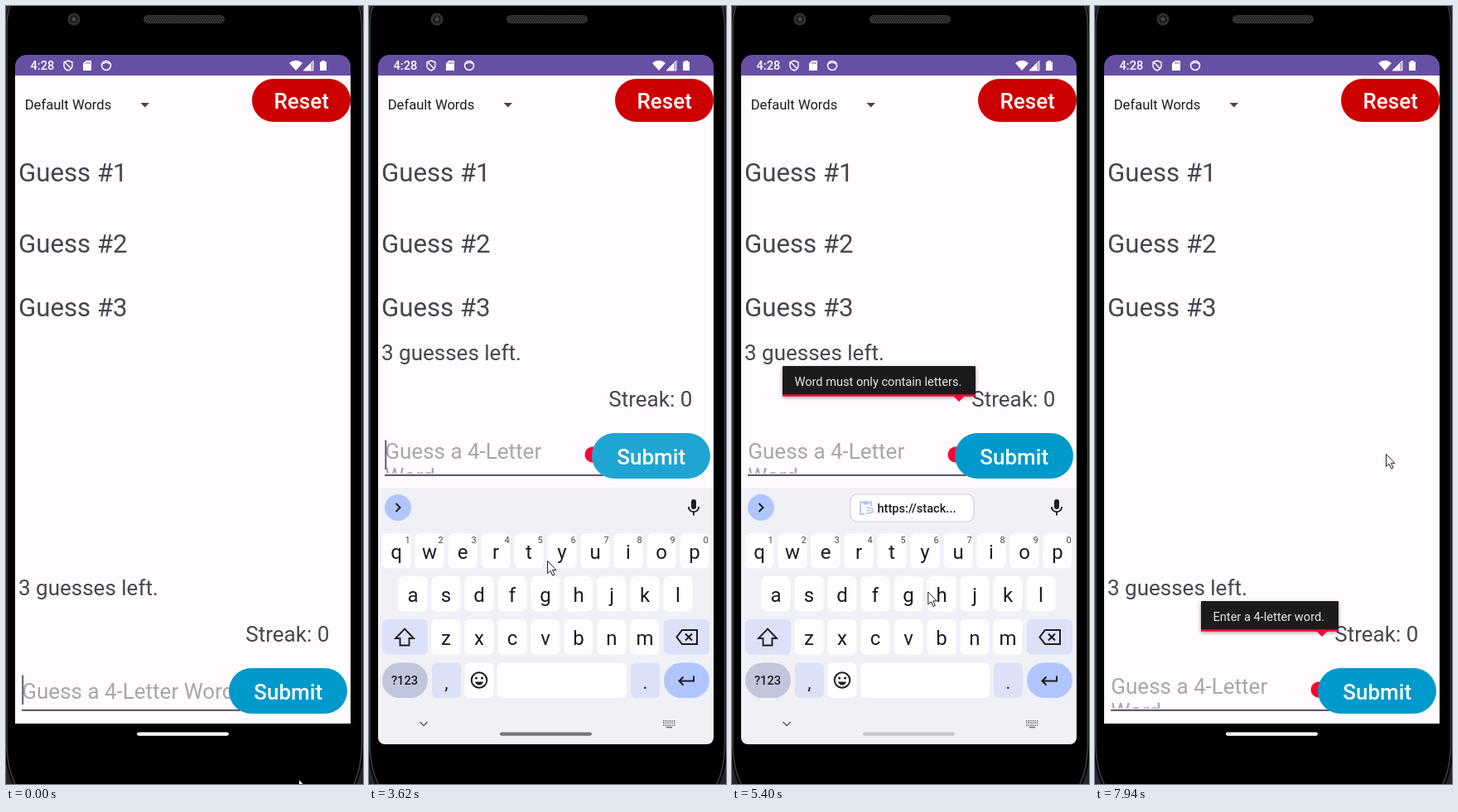
An HTML page with a canvas that plays this animation: 431x940 px, repeating every 8000 ms.

```html
<!DOCTYPE html>
<html lang="en">
<head>
<meta charset="utf-8">
<title>Word guessing app</title>
<style>
html, body { margin: 0; width: 100%; height: 100%; overflow: hidden; background: #000; }
canvas { display: block; width: 431px; height: 940px; }
</style>
</head>
<body>
<canvas id="stage"></canvas>
<script>
const W = 431, H = 940, LOOP = 8000;
const KB_HEIGHT = 310, NAV_ROW = 50, LIFT = 284;
const SMALL = 14.6, LABEL = 16.6, BODY = 26, TITLE = 31.2;
const canvas = document.getElementById('stage');
const dpr = window.devicePixelRatio || 1;
canvas.width = W * dpr;
canvas.height = H * dpr;
const c = canvas.getContext('2d');

// Timeline, in ms
const opens = [[1240, 1430], [4900, 5090]];
const closes = [[3720, 3960], [7080, 7330]];
const raised = [[1560, 4030], [5220, 7400]];
const clicks = [1130, 3430, 4690, 6740];
const submits = [3480, 6800];
const popups = [
  [3690, 5750, 61, 'Word must only contain letters.'],
  [7080, LOOP, 128, 'Enter a 4-letter word.']
];
const errors = [[3480, 5750], [6800, LOOP]];
const chips = [[1560, 3480], [5220, 6800]];
const typed = [
  [0, ''], [1790, '!'], [1950, '!!'], [2290, '!!!'], [2430, '!!!!'], [3480, ''],
  [5750, 'd'], [5950, 'dd'], [6150, 'ddd'], [6350, 'ddddd'], [6800, '']
];
const caretResets = [...typed.map(e => e[0]), 1130, 4030, 4690, 7400];
const pointer = [
  [0, 353, 934], [820, 347, 748], [890, 357, 743], [960, 357, 743], [1130, 190, 818],
  [1230, 188, 812], [1450, 172, 753], [1800, 230, 640], [2220, 311, 526], [2570, 316, 528],
  [2780, 316, 528], [3060, 336, 530], [3450, 336, 532], [3620, 215, 670], [3960, 245, 715],
  [4230, 257, 731], [4300, 257, 731], [4600, 181, 820], [4850, 181, 820], [5500, 240, 700],
  [6220, 308, 550], [6420, 308, 550], [6490, 340, 537], [6900, 340, 537], [7590, 351, 536],
  [7940, 351, 541], [LOOP, 351, 541]
];

const clamp = (v, a = 0, b = 1) => Math.min(b, Math.max(a, v));
const within = (t, spans) => spans.find(s => t >= s[0] && t < s[1]);
const progress = (t, [a, b]) => clamp((t - a) / (b - a));

function pointerAt(t) {
  const i = clamp(pointer.findIndex(p => p[0] > t), 1, pointer.length - 1);
  const [t0, x0, y0] = pointer[i - 1], [t1, x1, y1] = pointer[i];
  let k = clamp((t - t0) / (t1 - t0));
  k = k * k * (3 - 2 * k);
  return [x0 + (x1 - x0) * k, y0 + (y1 - y0) * k];
}

// Downward shift of the keyboard; it rests one nav row low until the app is raised
function keyboardShift(t) {
  const i = opens.findLastIndex(span => t >= span[0]);
  if (i < 0) return KB_HEIGHT;
  if (t >= closes[i][0]) return KB_HEIGHT * progress(t, closes[i]) ** 2;
  if (t >= raised[i][0]) return 0;
  return NAV_ROW + (KB_HEIGHT - NAV_ROW) * (1 - progress(t, opens[i])) ** 2;
}

function box(x, y, w, h, r, fill) {
  c.beginPath();
  c.roundRect(x, y, w, h, r);
  c.fillStyle = fill;
  c.fill();
}

function disc(x, y, r, fill) {
  c.beginPath();
  c.arc(x, y, r, 0, Math.PI * 2);
  c.fillStyle = fill;
  c.fill();
}

function shape(d, fill, stroke, width = 2) {
  const p = new Path2D(d);
  if (fill) { c.fillStyle = fill; c.fill(p); }
  if (stroke) { c.strokeStyle = stroke; c.lineWidth = width; c.stroke(p); }
}

function at(x, y, draw) {
  c.save();
  c.translate(x, y);
  draw();
  c.restore();
}

function font(size, weight = 400) {
  c.font = `${weight} ${size}px Roboto, sans-serif`;
}

function text(s, x, y, size, fill, weight, align = 'left') {
  font(size, weight);
  c.textAlign = align;
  c.fillStyle = fill;
  c.fillText(s, x, y);
}

function phone() {
  box(0, 0, W, H, 0, '#000');
  shape('M5 0Q1 10 1 24V896Q2 922 11 940', null, '#3d3d42', 1.6);
  shape('M426 0Q429.500 10 429.500 24V896Q428.500 922 420 940', null, '#3d3d42', 1.6);
  shape('M0 0H4Q0 8 0 18Z M431 0H427Q431 8 431 18Z M0 912Q3 930 8 940H0Z M431 912Q428 930 423 940H431Z', '#26262a');
  disc(82, 16, 7.5, '#333336');
  disc(82, 16, 5, '#1c1c1e');
  disc(82, 16, 2.4, '#4b4b50');
  box(166, 11, 98, 10, 5, '#343434');
  for (let y = 0; y < 4; y++)
    for (let x = 0; x < 31; x++) disc(170 + x * 3 + (y % 2) * 1.5, 12.8 + y * 2.1, 0.7, '#131313');
}

function statusBar() {
  box(11, 59, 405, 25, [14, 14, 0, 0], '#6750a4');
  text('4:28', 29.5, 77, SMALL, '#fff', 500);
  shape('M75 66L80 68V72Q80 76 75 78Q70 76 70 72V68Z M71 68L78 75', null, '#fff', 1.4);
  shape('M96.500 66H103V78H93V69.500Z', '#fff');
  shape('M97 67.500V70M99 67.500V70M101 67.500V70', null, '#6750a4', 0.9);
  c.beginPath();
  c.arc(121, 72, 5.5, 0, 7);
  c.strokeStyle = '#fff';
  c.lineWidth = 1.5;
  c.stroke();
  shape('M116 71A5.500 5.500 0 0 1 126 71Q121 67 116 71Z', '#fff');
  shape('M342 69Q350 62.500 358 69L350 78Z', '#fff');
  shape('M371 66V78H359Z', '#b9abdb');
  shape('M368 69V78H359Z', '#fff');
  shape('M371 66V78H359Z', null, '#fff', 0.8);
  shape('M379 67.500H381V66H385V67.500H387V78H379Z', '#fff');
}

function field(t) {
  const value = typed.filter(e => e[0] <= t).pop()[1];
  const hasError = within(t, errors);
  if (hasError) disc(270, 826, 9.5, '#ff0033');
  box(19, 849.8, 264, 2.2, 0, '#625b71');

  c.save();
  c.beginPath();
  c.rect(15, 800, 256, 48.5);
  c.clip();
  if (value) {
    text(value, 19.3, 837, BODY, '#1c1b1f');
    if (value[0] === 'd') box(19.3, 839, c.measureText(value).width, 1.5, 0, '#1c1b1f');
  } else if (hasError) {
    text('Guess a 4-Letter', 19.3, 831, BODY, '#a9a5ab');
    text('Word', 19.3, 861, BODY, '#a9a5ab');
  } else {
    text('Guess a 4-Letter Word', 19.3, 837, BODY, '#a9a5ab');
  }
  c.restore();

  const reset = Math.max(...caretResets.filter(v => v <= t));
  if ((t - reset) % 1000 < 500) {
    font(BODY);
    box(19.2 + c.measureText(value).width, 808.5, 2, 35.5, 0, '#625b71');
  }
}

function submitButton(t) {
  box(269, 800, 143, 55, 27.5, '#0099cc');
  const since = Math.min(...submits.map(s => t >= s ? t - s : Infinity));
  const glow = 0.12 * clamp((450 - since) / 250);
  if (glow > 0) box(269, 800, 143, 55, 27.5, `rgba(255,255,255,${glow})`);
  text('Submit', 340.7, 837.5, BODY, '#fff', 500, 'center');
}

function popup(t) {
  const p = within(t, popups);
  if (!p) return;
  const [, , x, label] = p;
  c.save();
  c.shadowColor = 'rgba(0,0,0,.4)';
  c.shadowBlur = 5;
  c.shadowOffsetY = 2;
  box(x, 719, 294 - x, 36, 1, '#1b1b1b');
  c.restore();
  box(x, 753.3, 294 - x, 2.5, 0, '#ff0033');
  shape('M267 755H281L274 762Z', '#ff0033');
  text(label, x + 14.5, 743, SMALL, '#e6e6e6');
}

function app(t) {
  const ink = '#49454f';
  box(11, 84, 405, 783, 0, '#fffbfe');
  statusBar();
  text('Default Words', 22.7, 125, LABEL, '#1c1b1f');
  shape('M162.500 117H173L167.750 122.500Z', '#4a4548');
  box(297, 88, 119, 52, 26, '#cc0000');
  text('Reset', 356.7, 124, BODY, '#fff', 500, 'center');
  [212, 297.7, 375].forEach((y, i) => text('Guess #' + (i + 1), 15, y, TITLE, ink));

  at(0, within(t, raised) ? -LIFT : 0, () => {
    text('3 guesses left.', 15, 712, BODY, ink);
    text('Streak: 0', 289.3, 768, BODY, ink);
    field(t);
    submitButton(t);
    popup(t);
  });
  box(158, 877.5, 111, 4.2, 2.1, '#fff');
}

function key(x, y, w, fill = '#fefeff', r = 6) {
  box(x, y, w, 42.5, r, fill);
}

function keyRow(letters, x, y, upper) {
  [...letters].forEach((ch, i) => {
    const cx = x + i * 40;
    key(cx - 17.5, y, 35);
    text(upper ? ch.toUpperCase() : ch, cx, y + 31, 24, '#1b1b20', 400, 'center');
  });
}

function chip() {
  box(143, 590, 149, 33, 8, '#fefeff');
  c.strokeStyle = '#c9cbd6';
  c.lineWidth = 1;
  c.stroke();
  shape('M160 614H155V599.500H168V604M158.500 601.500H164.500M161.500 599.500V597.500', null, '#b3c3f3', 1.8);
  shape('M162 606H165M162 613H165M165 606.500H167A3 3 0 0 1 167 612.500H165M162 609.500H168', null, '#b3c3f3', 1.6);
  text('https://stack...', 175.5, 612, SMALL, '#1b1b20', 500);
}

function keyboard(t) {
  const dark = '#1b1b20', func = '#dce1f7', upper = t < 2360;
  box(11, 582, 405, KB_HEIGHT, 0, '#f0f0f7');
  disc(35, 606, 16, '#b1c5ff');
  shape('M32.500 601L37.500 606L32.500 611', null, dark, 2);
  box(389, 596, 6, 12, 3, dark);
  shape('M385.800 605A6.200 6.200 0 0 0 398.200 605M392 611V615.500', null, dark, 1.8);
  if (within(t, chips)) chip();

  keyRow('qwertyuiop', 33, 637, upper);
  [...'1234567890'].forEach((n, i) => text(n, 46.5 + i * 40, 649, 11, '#44464f', 400, 'center'));
  keyRow('asdfghjkl', 53, 689, upper);
  key(16, 741, 55, func);
  shape('M43 752.500L54 764H48.500V772.500H37.500V764H32Z', upper ? dark : null, dark, upper ? 0.5 : 1.9);
  keyRow('zxcvbnm', 93, 741, upper);
  key(356, 741, 55, func);
  shape('M378 754H396V771H378L371.500 762.500Z M382 758.500L390 766.500M390 758.500L382 766.500', null, dark, 2);

  key(16, 793.5, 55, '#c1c6dc', 21);
  text('?123', 43, 820, SMALL, dark, 500, 'center');
  key(76, 793.5, 35, func);
  text(',', 93.5, 825, 22, dark, 400, 'center');
  key(115.5, 793.5, 35);
  c.beginPath();
  c.arc(133, 814.5, 9.3, 0, 7);
  c.strokeStyle = dark;
  c.lineWidth = 2;
  c.stroke();
  disc(129.5, 812, 1.5, dark);
  disc(136.5, 812, 1.5, dark);
  shape('M128 816.500H138Q136.500 820.500 133 820.500Q129.500 820.500 128 816.500Z', dark);
  key(155, 793.5, 156);
  key(316, 793.5, 35, func);
  text('.', 333.5, 825, 22, dark, 400, 'center');
  key(356, 793.5, 55, '#b1c5ff', 21);
  shape('M392 809.500V815.500H375M379.500 810.500L374.500 815.500L379.500 820.500', null, dark, 2);

  shape('M61.500 865L66 869.500L70.500 865', null, '#5c5d64', 1.5);
  for (let y = 0; y < 3; y++)
    for (let x = 0; x < 6; x++) box(355 + x * 2.6, 863 + y * 2.6, 1.5, 1.5, 0, '#6b6c73');
  box(359, 870.8, 7, 1.4, 0, '#6b6c73');

  const opened = opens.findLast(o => o[0] <= t)[1];
  const shade = Math.round(198 - 80 * clamp((t - opened - 860) / 700));
  box(158, 877.5, 111, 4.2, 2.1, `rgb(${shade},${shade},${shade + 4})`);
}

function mouse(t) {
  const [x, y] = pointerAt(t);
  if (clicks.some(k => t >= k && t < k + 140)) disc(x - 1, y + 3, 12.5, 'rgba(245,232,70,.8)');
  at(x, y, () => shape('M.5 .5V15.500L4 12.300L6.600 18L9 16.900L6.500 11.400H11Z', '#fff', '#222', 1));
}

function draw(t) {
  c.setTransform(dpr, 0, 0, dpr, 0, 0);
  phone();
  app(t);
  const shift = keyboardShift(t);
  if (shift < KB_HEIGHT) {
    c.save();
    c.beginPath();
    c.roundRect(11, 400, 405, 492, [0, 0, 8, 8]);
    c.clip();
    at(0, shift, () => keyboard(t));
    c.restore();
  }
  mouse(t);
}

const start = performance.now();
function tick() {
  draw((performance.now() - start) % LOOP);
  requestAnimationFrame(tick);
}
tick();
</script>
</body>
</html>
```
